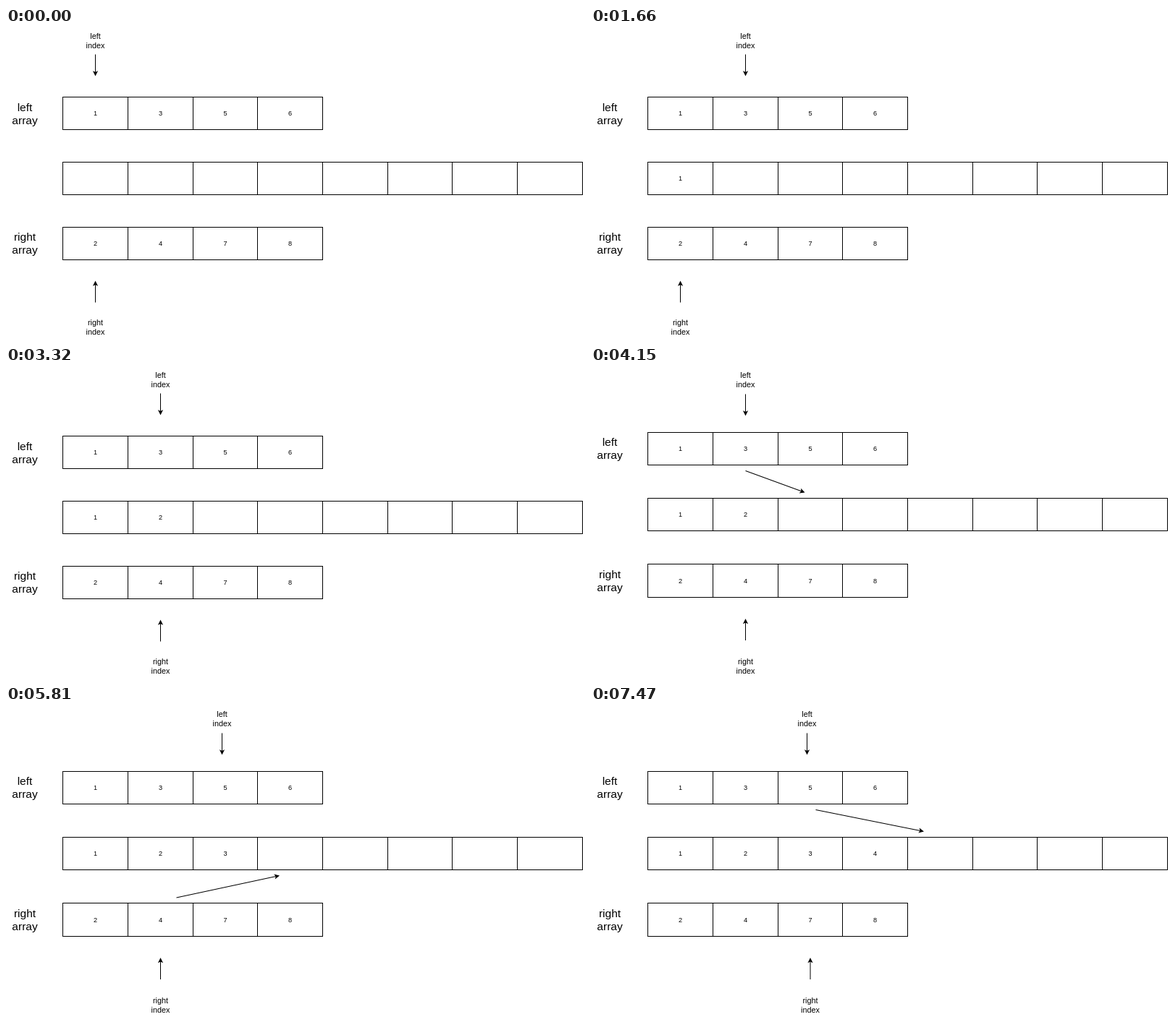
Write an HTML page with a canvas that moves like this. It is 800x430 px and loops after 8 s.

```html
<!DOCTYPE html>
<html>
<head>
<meta charset="utf-8">
<style>
html, body { margin: 0; width: 100%; height: 100%; overflow: hidden; background: #fff; }
canvas { display: block; }
</style>
</head>
<body>
<canvas id="stage" width="800" height="430"></canvas>
<script>
const ctx = document.getElementById('stage').getContext('2d');
const LOOP = 8000, STEP = 830;
const LEFT = [1, 3, 5, 6], RIGHT = [2, 4, 7, 8], MERGED = [1, 2, 3, 4];

// Row edges, caption baselines and pointer offset of the two page layouts
const wide = { rows: [[95, 140], [185, 230], [275, 320]], captions: [114.5, 293.5], down: 66.5, up: 349.5 };
const tight = { rows: [[90, 135], [181, 226], [272, 318]], captions: [109, 291.5], down: 67.5, up: 348 };

// layout, left pointer x, right pointer x, merged count, copy arrow
const steps = [
  [wide, 123.5, 123.5, 0],
  [wide, 123.5, 123.5, 0, [123.5, 148, 123.5, 211]],
  [wide, 213.5, 123.5, 1],
  [tight, 213.5, 123.5, 1, [138.5, 265, 206, 234.5]],
  [wide, 213.5, 213.5, 2],
  [tight, 213.5, 213.5, 2, [213.5, 143.5, 295.5, 173.5]],
  [tight, 298.5, 213.5, 3],
  [tight, 298.5, 213.5, 3, [235.5, 265, 378, 234.5]],
  [tight, 298.5, 303, 4],
  [tight, 298.5, 303, 4, [310.5, 143.5, 460, 173.5]]
];

const edge = i => Math.round(78.3 + 89.67 * i) + 0.5;

function text(str, x, y, size) {
  ctx.font = `${size}px "Liberation Sans", Helvetica, Arial, sans-serif`;
  ctx.fillText(str, x, y);
}

function row([top, bottom], count, values) {
  for (let i = 0; i < count; i++) {
    const x = edge(i), w = edge(i + 1) - x;
    ctx.strokeRect(x, top + 0.5, w, bottom - top);
    if (i < values.length) text(values[i], x + w / 2, (top + bottom) / 2 + 3.6, 9.2);
  }
}

function arrow(x1, y1, x2, y2) {
  ctx.save();
  ctx.translate(x2, y2);
  ctx.rotate(Math.atan2(y2 - y1, x2 - x1));
  ctx.beginPath();
  ctx.moveTo(-Math.hypot(x2 - x1, y2 - y1), 0);
  ctx.lineTo(-5, 0);
  ctx.stroke();
  ctx.beginPath();
  ctx.moveTo(0, 0);
  ctx.lineTo(-7.2, -3.6);
  ctx.lineTo(-5.4, 0);
  ctx.lineTo(-7.2, 3.6);
  ctx.fill();
  ctx.restore();
}

function pair(a, b, x, y, size, gap) {
  text(a, x, y, size);
  text(b, x, y + gap, size);
}

function draw() {
  const step = Math.floor(performance.now() % LOOP / STEP);
  const [layout, leftX, rightX, merged, copy] = steps[step];
  ctx.fillStyle = '#fff';
  ctx.fillRect(0, 0, 800, 430);
  ctx.fillStyle = ctx.strokeStyle = '#000';
  ctx.textAlign = 'center';

  row(layout.rows[0], 4, LEFT);
  row(layout.rows[1], 8, MERGED.slice(0, merged));
  row(layout.rows[2], 4, RIGHT);
  pair('left', 'array', 26, layout.captions[0], 15.5, 18);
  pair('right', 'array', 26, layout.captions[1], 15.5, 18);

  pair('left', 'index', leftX, 15, 10.8, 13);
  pair('right', 'index', rightX, 411, 10.8, 13);
  arrow(leftX, layout.down - 30, leftX, layout.down);
  arrow(rightX, layout.up + 30, rightX, layout.up);
  if (copy) arrow(...copy);
  requestAnimationFrame(draw);
}
draw();
</script>
</body>
</html>
```
